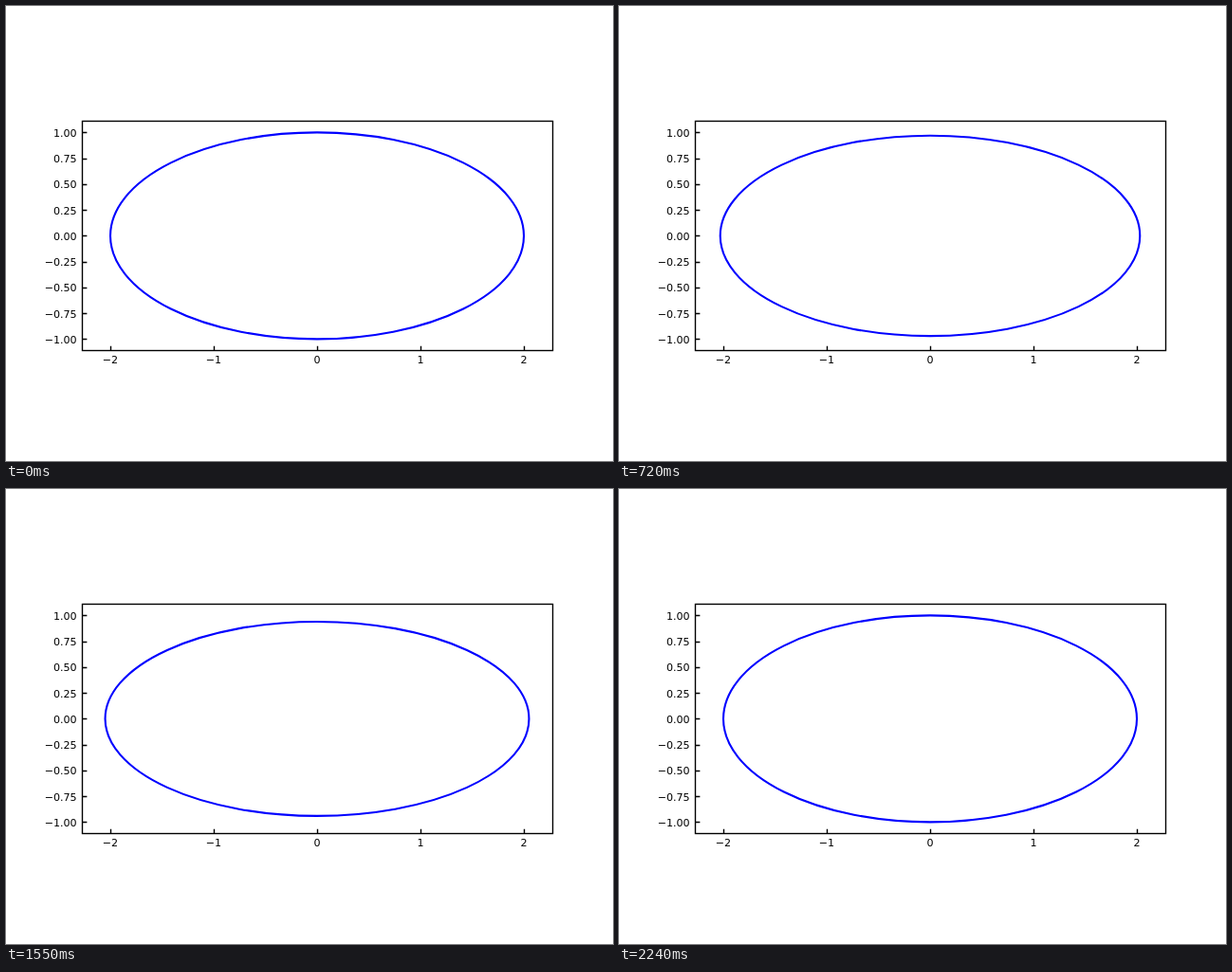
These frames come from a looping animation (640x480 px, 2260 ms). An HTML page:

```html
<!DOCTYPE html>
<html lang="en">
<head>
<meta charset="utf-8">
<title>Trembling ellipse</title>
<style>
  html, body { margin: 0; width: 100%; height: 100%; overflow: hidden; background: #fff; }
  svg { display: block; font: 11.11px "DejaVu Sans", sans-serif; }
  .axis { fill: none; stroke: #000; stroke-width: 1.39; }
  #curve { fill: none; stroke: #00f; stroke-width: 2.08; }
</style>
</head>
<body>
<svg width="640" height="480" viewBox="0 0 640 480">
  <g id="labels"></g>
  <ellipse id="curve" cx="328" cy="242.4"/>
  <path id="ticks" class="axis"/>
  <rect class="axis" x="80.5" y="121.5" width="496" height="242"/>
</svg>
<script>
const LOOP = 2260, UNIT = 109, CX = 328, CY = 242.4;
const byId = id => document.getElementById(id);

// Key points of the walk: time, steps taken so far, stretch in hundredths.
const keys = [
  [0, 0, 0], [260, 8, 4], [540, 17, 5], [610, 18, 4], [860, 25, 3], [1030, 26, 4],
  [1170, 30, 0], [1550, 41, 5], [1810, 49, 7], [2110, 59, 3], [2240, 64, 0], [LOOP, 64, 0]
];

// Every step changes the stretch by one, so its parity is that of the step count.
function stretchAt(time) {
  const i = keys.findIndex(key => key[0] > time);
  const [t0, step0, stretch0] = keys[i - 1], [t1, step1, stretch1] = keys[i];
  const taken = Math.floor((step1 - step0) * (time - t0) / (t1 - t0));
  const trend = stretch0 + (stretch1 - stretch0) * taken / (step1 - step0 || 1);
  const parity = (step0 + taken) % 2;
  return (2 * Math.round((trend - parity) / 2) + parity) / 100;
}

function drawAxes() {
  const snap = v => Math.round(v) + 0.5;
  let ticks = "", labels = "";
  const label = (x, y, anchor, value) => {
    labels += `<text x="${x}" y="${y}" text-anchor="${anchor}">${value.replace("-", "−")}</text>`;
  };
  for (let v = -2; v <= 2; v++) {
    const x = CX + v * UNIT;
    ticks += `M${snap(x)} 363.5v-4.86`;
    label(x, 377, "middle", String(v));
  }
  for (let v = -1; v <= 1; v += 0.25) {
    const y = CY - v * UNIT;
    ticks += `M80.5 ${snap(y)}h4.86`;
    label(74.7, Math.round(y + 4.4), "end", v.toFixed(2));
  }
  byId("ticks").setAttribute("d", ticks);
  byId("labels").innerHTML = labels;
}

function draw() {
  const stretch = stretchAt(performance.now() % LOOP);
  // Beyond 0.04 the ellipse flattens twice as fast as it widens.
  const squash = stretch + Math.max(0, stretch - 0.04);
  byId("curve").setAttribute("rx", (2 + stretch) * UNIT);
  byId("curve").setAttribute("ry", (1 - squash) * UNIT);
  requestAnimationFrame(draw);
}

drawAxes();
draw();
</script>
</body>
</html>
```
